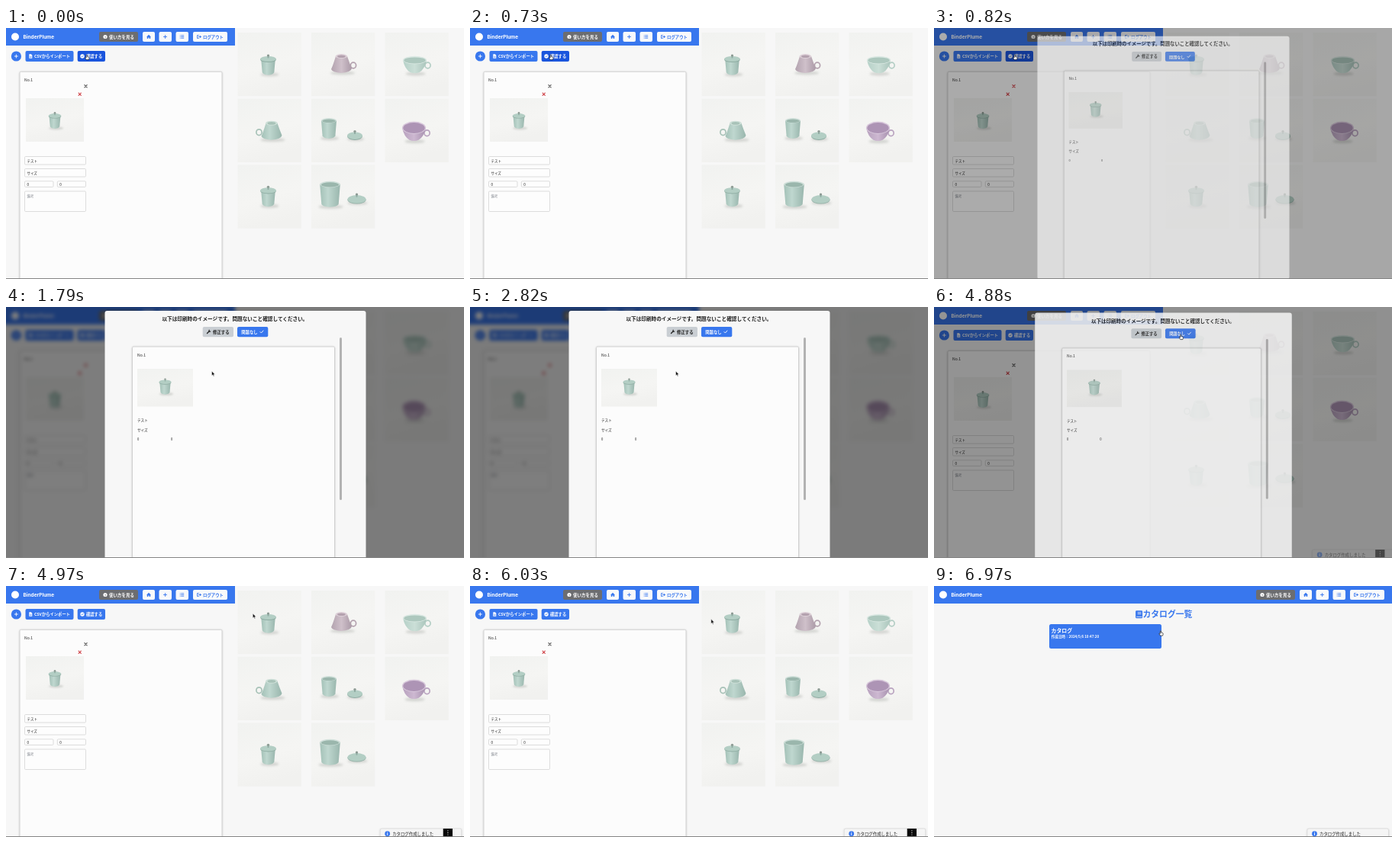
Animation, 600 px wide and 329 px high, one loop 7 s. Source, as an HTML page:

```html
<!DOCTYPE html>
<html lang="ja">
<head>
<meta charset="utf-8">
<title>Catalog demo</title>
<style>
  html, body { margin: 0; width: 100%; height: 100%; overflow: hidden; background: #f7f7f7; }
  svg { display: block; width: 600px; height: 329px; }
  text { font-family: "Noto Sans CJK JP", "Noto Sans CJK", "Noto Sans", sans-serif; dominant-baseline: central; white-space: pre; }
</style>
</head>
<body>
<svg id="stage" viewBox="0 0 600 329">
  <defs>
    <linearGradient id="green"><stop offset="0" stop-color="#a3c1b7"/><stop offset=".4" stop-color="#bfd7cf"/><stop offset="1" stop-color="#99b6ad"/></linearGradient>
    <linearGradient id="pale"><stop offset="0" stop-color="#b5d0c7"/><stop offset=".5" stop-color="#cbdfd7"/><stop offset="1" stop-color="#a9c4bb"/></linearGradient>
    <linearGradient id="mauve"><stop offset="0" stop-color="#b3a3af"/><stop offset=".5" stop-color="#cfc0ca"/><stop offset="1" stop-color="#ab9aa7"/></linearGradient>
    <linearGradient id="lilac"><stop offset="0" stop-color="#b6a0bd"/><stop offset=".5" stop-color="#cdb8d1"/><stop offset="1" stop-color="#a690ae"/></linearGradient>
    <linearGradient id="photo" x2=".3" y2="1"><stop offset="0" stop-color="#f1f2f0"/><stop offset=".6" stop-color="#f5f5f3"/><stop offset="1" stop-color="#f1f1ef"/></linearGradient>
    <filter id="soft" x="-50%" y="-100%" width="200%" height="300%"><feGaussianBlur stdDeviation="1.6"/></filter>
    <filter id="lift" x="-5%" y="-5%" width="110%" height="110%"><feDropShadow dx="0" dy=".6" stdDeviation="1" flood-opacity=".22"/></filter>
  </defs>
  <g id="page"></g>
  <g id="list"></g>
  <g id="toast"></g>
  <rect id="shade" width="600" height="329"/>
  <g id="modal"></g>
  <rect y="328" width="600" height="1" fill="#858585"/>
  <g id="cursor">
    <path id="arrow" d="M0 0V6L1.4 4.8 2.4 7 3.3 6.6 2.4 4.5H4.3Z" fill="#111" stroke="#fff" stroke-width=".5"/>
    <path id="hand" d="M-.7 .5Q0-.5 .6.5V2.6L2.8 3.2Q3.5 3.5 3.2 4.4L2.6 6.6H-.5L-2.2 4.1Q-2.1 3.3-.7 4Z" fill="#fff" stroke="#222" stroke-width=".7"/>
  </g>
</svg>
<script>
const $ = id => document.getElementById(id);
const BLUE = '#3877ee', DEEP = '#1a55dd', INK = '#222';

const rect = (x, y, w, h, fill, r = 0, more = '') =>
  `<rect x="${x}" y="${y}" width="${w}" height="${h}" rx="${r}" fill="${fill}" ${more}/>`;
const text = (x, y, size, str, fill = INK, weight = 400, more = '') =>
  `<text x="${x}" y="${y}" font-size="${size}" fill="${fill}" font-weight="${weight}" ${more}>${str}</text>`;
const oval = (x, y, rx, ry, fill, more = '') =>
  `<ellipse cx="${x}" cy="${y}" rx="${rx}" ry="${ry}" fill="${fill}" ${more}/>`;
const path = (d, fill, more = '') => `<path d="${d}" fill="${fill}" ${more}/>`;
const line = (d, color, w = 1) => path(d, 'none', `stroke="${color}" stroke-width="${w}" stroke-linecap="round" stroke-linejoin="round"`);
const at = (x, y, body, s = 1) => `<g transform="translate(${x} ${y}) scale(${s})">${body}</g>`;

// Icons, centred on the origin
const icon = {
  help: c => oval(0, 0, 2.6, 2.6, '#fff') + text(0, 0, 4, '?', c, 900, 'text-anchor="middle"'),
  info: c => oval(0, 0, 3.4, 3.4, c) + line('M0-.2V1.6M0-1.7V-1.6', '#fff', 1),
  home: c => path('M-3 .2L0-2.7 3 .2H2.2V2.6H.7V.9H-.7V2.6H-2.2V.2Z', c),
  plus: c => line('M-2 0H2M0-2V2', c, .9),
  list: c => line('M-.9-1.8H2.3M-.9 0H2.3M-.9 1.8H2.3M-2.4-1.8h.1M-2.4 0h.1M-2.4 1.8h.1', c, .8),
  exit: c => line('M-.8-2H-2.4V2H-.8M-.8 0H2.4M1-1.5L2.5 0 1 1.5', c, .9),
  file: c => path('M-2-2.8H.6L2-1.3V2.8H-2Z', c) + line('M-.9 .2H.9M-.9 1.5H.9', BLUE, .5),
  done: c => oval(0, 0, 2.7, 2.7, '#fff') + line('M-1.2 .1L-.3 1 1.3-.9', c, .8),
  tick: c => line('M-2 .1L-.6 1.5 2-1.5', c, .9),
  tool: c => line('M-2 2L.8-.8', c, 1.3) + line('M.7-2.3Q-.2 .4 2.3-.5', c, 1.2),
  book: c => rect(-4.5, -5, 9, 10, c, 1.3) + line('M-1.5-2.6H2.5M-1.5-.7H2.5M-3 3H3.5', '#f7f7f7', .8),
  cross: c => line('M-1.6-1.6L1.6 1.6M1.6-1.6L-1.6 1.6', c, 1.2),
};
const put = (name, x, y, c, s) => at(x, y, icon[name](c), s);

// Tableware, drawn around the origin
const ground = (x, y, rx) => oval(x, y, rx, 2.6, '#c9cbc7', 'filter="url(#soft)" opacity=".75"');
const ring = (x, y, c) => oval(x, y, 3.6, 3.9, 'none', `stroke="${c}" stroke-width="1.7"`);
const lid = (x, y, rx, ry) =>
  oval(x, y + .9, rx, ry, '#8eaca2') + oval(x, y, rx, ry, '#b3cec4') +
  rect(x - 1, y - ry - .4, 2, 3, '#91ada4', .6) + oval(x, y - ry - 1, 1.7, 1.5, '#8d9b94');
const tumbler = (w, h) =>
  path(`M${-w} ${-h}L${-w * .84} ${h - 3}Q${-w * .75} ${h} 0 ${h + .8}Q${w * .75} ${h} ${w * .84} ${h - 3}L${w} ${-h}Z`, 'url(#green)') +
  oval(0, -h, w, w * .31, '#d0e0da') + oval(0, -h + .6, w * .87, w * .23, '#9ab6ac');
const upturned = (fill, top, side, c) =>
  ground(2, 11, 16) + ring(16 * side, 1, c) +
  path('M-7-11Q-11 2-13 6Q-12 10 0 11Q13 10 14 5Q11-2 8-11Z', fill) +
  oval(.4, -11, 7.8, 3, top) + oval(.4, -10.8, 5.4, 1.8, c);
const bowl = (fill, rim, inner, ry, c) =>
  ground(1, 15, 13) + ring(17, 4, c) +
  path('M-15.5-3Q-13 9-6 13Q0 15.5 6 13Q13 9 15.5-3Z', fill) +
  oval(0, -3, 15.6, ry, rim) + oval(0, -2.6, 14.2, ry - 1.2, inner);
const art = {
  jar: ground(2, 13, 12) + at(0, 3, tumbler(9.3, 10)) + lid(0, -7.5, 10.4, 3.6),
  cup: upturned('url(#mauve)', '#ddd0d8', 1, '#b4a2af'),
  tea: bowl('url(#pale)', '#dce9e4', '#adc8be', 5.2, '#b4cec5'),
  mug: upturned('url(#green)', '#cfe0d9', -1, '#a8c2b8'),
  set: ground(1, 12, 12) + tumbler(10, 11.5) + ground(35, 13, 11) + lid(34, 8.5, 10, 4.8),
  big: ground(1, 15, 16) + tumbler(13.3, 14.6) + ground(36, 10, 13) + lid(35, 5, 12, 5.3),
  dish: bowl('url(#lilac)', '#d9c9dc', '#ad94b5', 8.2, '#baa4c0'),
};

const field = (x, y, w, h, str, fill = INK) =>
  rect(x, y, w, h, '#fdfdfd', 1.2, 'stroke="#cfcfcf" stroke-width=".7"') + text(x + 3, y + Math.min(h / 2, 5.5), 4.5, str, fill, 500);
const paper = (x, y) => rect(x, y, 265, 300, '#fcfcfc', 1.5, 'stroke="#c8c8c8" stroke-width=".8" filter="url(#lift)"');

function header(right) {
  const white = (x, w) => rect(right + x, 5, w, 13, '#f8f9fb', 2);
  return rect(-15, -15, right + 15, 38, BLUE) +
    oval(12, 11.5, 5, 5, '#fff') +
    `<text x="22.5" y="12" font-size="6.5" font-weight="700" fill="#fff" style="font-family:Inter,sans-serif">BinderPlume</text>` +
    rect(right - 178, 5, 51, 13, '#6c6d70', 2) + put('help', right - 170, 11.5, '#6c6d70') +
    text(right - 165, 11.5, 5.5, '使い方を見る', '#fff', 700) +
    white(-121, 16) + put('home', right - 113, 11.5, BLUE) +
    white(-99.5, 16.5) + put('plus', right - 91.5, 11.5, BLUE) +
    white(-77.5, 16.5) + put('list', right - 69.5, 11.5, BLUE) +
    white(-55, 45) + put('exit', right - 47, 11.5, BLUE) +
    text(right - 42, 11.5, 5.4, 'ログアウト', BLUE, 700);
}

const shots = [
  ['jar', 40, 42], ['cup', 39, 42], ['tea', 39, 39],
  ['mug', 44, 43], ['set', 23, 40], ['dish', 38, 41],
  ['jar', 40, 41], ['big', 24.5, 40],
];
const gallery = shots.map(([name, x, y], i) =>
  at(303.5 + i % 3 * 96.5, 6 + Math.floor(i / 3) * 86.7, rect(0, 0, 83.3, 83.3, 'url(#photo)') + at(x, y, art[name]))).join('');

$('page').innerHTML =
  rect(-20, -20, 640, 370, '#f7f7f7') + header(300) +
  oval(13.4, 37, 6.6, 6.6, BLUE) + put('plus', 13.4, 37, '#fff') +
  rect(25.5, 30, 63, 14, BLUE, 2) + put('file', 32.3, 37, '#fff') + text(37, 37, 5.3, 'CSVからインポート', '#fff', 700) +
  rect(93.7, 30, 36.3, 14, BLUE, 2, 'id="confirm"') + put('done', 100, 37, BLUE) + text(105, 37, 5.3, '確認する', '#fff', 700) +
  paper(18, 57.3) + text(24, 67.5, 5.1, 'No.1', INK, 500) +
  `<g id="close">${put('cross', 104.5, 76.2, 'currentColor')}</g>` + put('cross', 96.7, 86.7, '#d0454a') +
  rect(26, 92, 76, 57, 'url(#photo)') + at(64, 121, art.jar, .8) +
  field(24.5, 168.5, 80, 10.5, 'テスト') + field(24.5, 184.5, 80, 10.5, 'サイズ') +
  field(24.5, 200.8, 37.5, 7.6, '0') + field(67.3, 200.8, 37.2, 7.6, '0') +
  field(24.5, 214, 80, 26.5, '備考', '#8b8f96') + gallery;

$('list').innerHTML =
  rect(0, 0, 600, 329, '#f6f6f6') + header(600) +
  put('book', 268.6, 37.3, BLUE) + text(273.5, 36.3, 10.8, 'カタログ一覧', BLUE, 700) +
  rect(151, 50, 147, 32, BLUE, 2.5) + text(153.5, 57.6, 6.9, 'カタログ', '#fff', 700) +
  text(153.8, 66, 4.55, '作成日時：2024/5/6 10:47:20', '#fff', 700);

$('toast').innerHTML =
  rect(489.5, 318, 106.5, 16, '#f5f5f5', 2, 'stroke="#d2d2d2" stroke-width=".6" filter="url(#lift)"') +
  put('info', 499, 324.7, BLUE) + text(505.5, 324.7, 5.4, 'カタログ作成しました', INK, 500) +
  `<g id="menu">${rect(572, 318, 12.3, 11, '#080808')}${line('M578.2 320.8h.01M578.2 323.4h.01M578.2 326h.01', '#fff', 1.2)}</g>`;

$('modal').innerHTML =
  rect(129.5, 5, 342, 330, '#f7f7f7', 3) +
  text(204.5, 15.2, 6.63, '以下は印刷時のイメージです。問題ないこと確認してください。', '#1b1b1b', 700) +
  rect(257.7, 26, 40.3, 13.2, '#c9ced3', 2) + put('tool', 265.5, 32.5, INK) + text(271, 32.5, 5.4, '修正する', INK, 700) +
  rect(303, 26, 40.3, 13.2, BLUE, 2) + text(308.3, 32.5, 5.3, '問題なし', '#fff', 700) + put('tick', 335, 32.5, '#fff') +
  paper(165.5, 52) + text(172, 62.3, 5.1, 'No.1', INK, 500) +
  rect(172, 81, 73, 49.5, 'url(#photo)') + at(208.5, 104, art.jar, .77) +
  text(172, 148.3, 4.6, 'テスト', INK, 500) + text(172, 160.5, 4.6, 'サイズ', INK, 500) +
  text(172, 172.8, 4.2, '0', INK, 500) + text(216, 172.8, 4.2, '0', INK, 500) +
  rect(437, 40, 3, 213, '#b2b2b2', 1.5);

// Pointer stops: time, x, y
const stops = [
  [0, 105.8, 35], [1080, 105.8, 35], [1460, 269.5, 84], [2960, 269.5, 84], [3620, 324.5, 42],
  [3900, 324.5, 42], [4200, 323.3, 36], [5680, 323.3, 36], [6360, 309, 50], [6530, 297, 58.5], [7000, 297, 58.5],
];
const span = (t, a, b) => Math.max(0, Math.min(1, (t - a) / (b - a)));
const smooth = k => k * k * (3 - 2 * k);

// cubic-bezier(0, 0, .2, 1)
function easeOut(k) {
  let lo = 0, hi = 1;
  for (let i = 0; i < 20; i++) {
    const s = (lo + hi) / 2;
    if (.6 * s * s * (1 - s) + s ** 3 < k) lo = s; else hi = s;
  }
  return 3 * lo * lo * (1 - lo) + lo ** 3;
}

function pointer(t) {
  const i = stops.findIndex(s => s[0] > t);
  const [a, x, y] = stops[i - 1], [b, u, v] = stops[i];
  const k = smooth(span(t, a, b));
  return [x + (u - x) * k, y + (v - y) * k];
}

const show = (el, on) => { $(el).style.display = on ? '' : 'none'; };

function draw(t) {
  const open = t < 4867 ? easeOut(span(t, 760, 960)) : 1 - span(t, 4867, 4955);
  const listed = t >= 6390;
  show('page', !listed);
  show('list', listed);

  $('page').style.filter = t > 860 && t < 4867 ? 'blur(2.6px)' : 'none';
  $('close').style.color = t > 760 && t < 4867 ? '#d0454a' : '#555';
  $('confirm').setAttribute('fill', t < 1100 ? DEEP : BLUE);

  show('shade', open > 0);
  $('shade').setAttribute('opacity', open * .5);
  show('modal', open > 0);
  $('modal').setAttribute('opacity', open);
  const s = .9 + .1 * open;
  $('modal').setAttribute('transform', `translate(300.5 167) scale(${s}) translate(-300.5 -167)`);

  const slide = span(t, 4860, 4955);
  show('toast', slide > 0);
  $('toast').setAttribute('opacity', Math.min(1, .4 + slide * .6));
  $('toast').setAttribute('transform', `translate(${(1 - slide) * 7 + (listed ? -.5 : .7)} 0)`);
  show('menu', !listed);

  const [x, y] = pointer(t);
  $('cursor').setAttribute('transform', `translate(${x} ${y})`);
  const hand = t < 1100 || (t > 4080 && t < 4955) || t > 6500;
  show('hand', hand);
  show('arrow', !hand);
}

const start = performance.now();
function tick() {
  draw((performance.now() - start) % 7000);
  requestAnimationFrame(tick);
}
tick();
</script>
</body>
</html>
```
